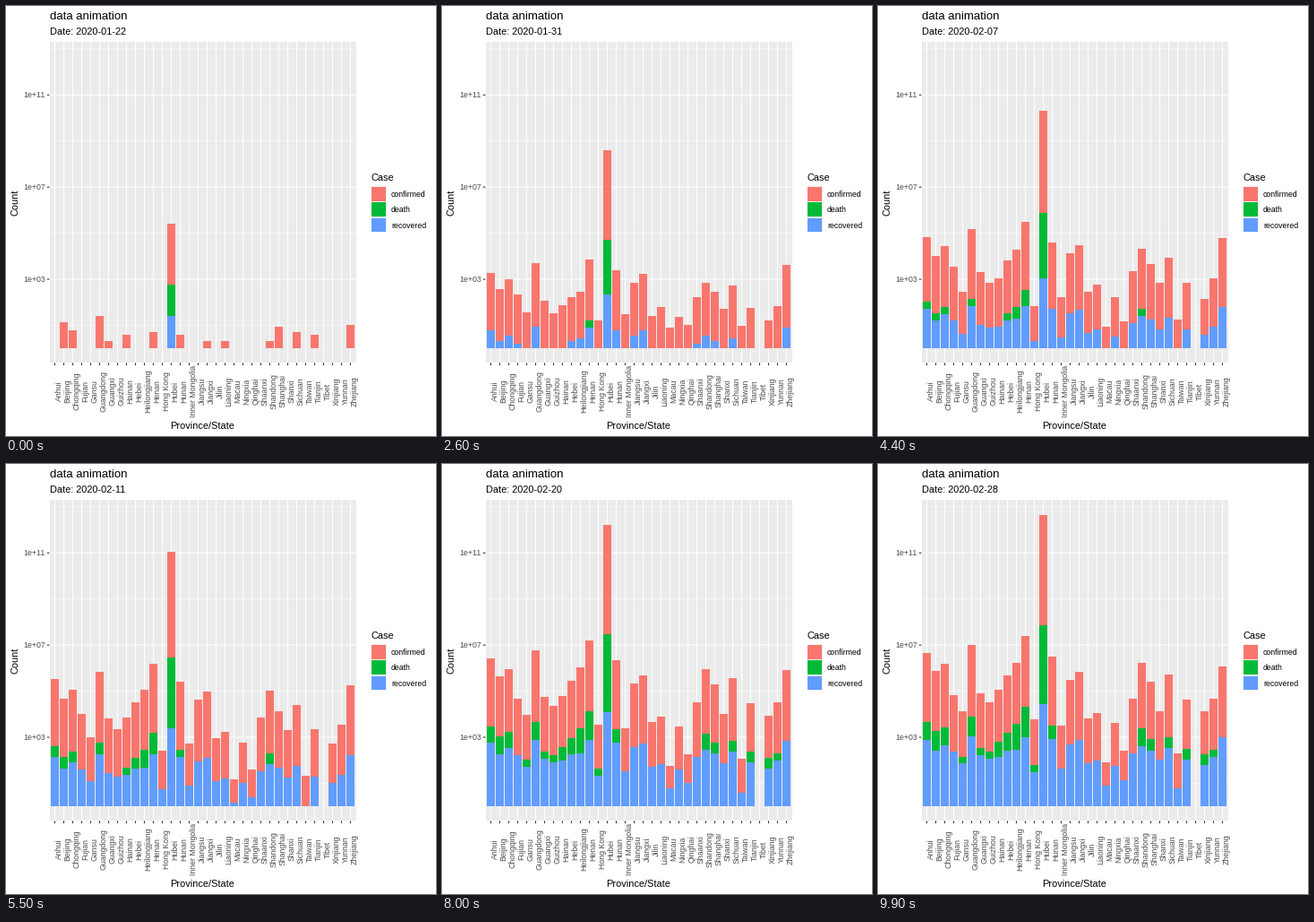
A matplotlib script that plays this animation: 480x480 px, repeating every 10000 ms.

```python
import matplotlib.pyplot as plt
import numpy as np
from matplotlib.animation import FuncAnimation
from matplotlib.collections import PolyCollection
from matplotlib.patches import Rectangle

SIZE, DPI = 480, 80
PT = 72 / DPI                      # points per pixel
FRAMES, LAST = 100, 37             # frames per loop, last day
LEFT, RIGHT, TOP, BOTTOM = 48.5, 390.5, 39.5, 398.4
X0, STEP, BAR = 54.5, 10, 9
BASE, DECADE = 382.2, 25.72
START = np.datetime64("2020-01-22")
CASES = (("confirmed", "#F8766D"), ("death", "#00BA38"), ("recovered", "#619CFF"))
DAYS = np.arange(LAST + 1)

names, logs = [], []


def log_count(x):
    """log10 of whole counts; NaN where there are none."""
    n = np.round(x)
    return np.where(n >= 1, np.log10(np.maximum(n, 1)), np.nan)


def spread(start, early, final, rate):
    """Fast rise to day 5, then Gompertz growth towards the final count."""
    s, e, f = np.log10([start, early, final])
    rise = s + (e - s) * np.minimum(DAYS / 5, 1) ** 0.75
    settle = f - (f - e) * np.exp(-rate * (DAYS - 5))
    return 10 ** np.where(DAYS < 5, rise, settle)


def approach(final, depth, bend, floor):
    """Reach the final count on the last day, `depth` decades lower on day 10."""
    gap = depth * ((LAST - DAYS) / (LAST - 10)) ** bend
    return np.maximum(final * 10 ** -gap, floor)


def add(name, early, final, start=1, deaths=0, cured=0.8, rate=0.16, bend=2):
    names.append(name)
    logs.append([
        log_count(spread(start, early, final, rate)),
        log_count(approach(deaths, 1.03, 2.2, 0.038 * start * (deaths > 0))),
        log_count(approach(cured * final, 2.05, bend, 0.057 * start)),
    ])


add("Anhui", 70, 990, deaths=6)
add("Beijing", 80, 410, start=14, deaths=7, cured=0.63)
add("Chongqing", 110, 576, start=6, deaths=6)
add("Fujian", 59, 296)
add("Gansu", 14, 91, deaths=2)
add("Guangdong", 151, 1349, start=26, deaths=7, rate=0.19)
add("Guangxi", 46, 252, start=2, deaths=2, cured=0.66)
add("Guizhou", 7, 146, deaths=2)
add("Hainan", 33, 168, start=4, deaths=5)
add("Hebei", 18, 318, deaths=6)
add("Heilongjiang", 21, 480, deaths=13, cured=0.6)
add("Henan", 128, 1272, start=5, deaths=20)
add("Hong Kong", 8, 150, deaths=2, cured=0.2, rate=0.06)
add("Hubei", 1423, 65914, start=444, deaths=2682, cured=0.4, rate=0.126, bend=1.4)
add("Hunan", 100, 1017, start=4, deaths=4, rate=0.19)
add("Inner Mongolia", 11, 75, cured=0.6)
add("Jiangsu", 47, 631)
add("Jiangxi", 72, 935, start=2)
add("Jilin", 6, 93)
add("Liaoning", 27, 121, start=2)
add("Macau", 6, 10)
add("Ningxia", 7, 72)
add("Qinghai", 6, 18)
add("Shaanxi", 35, 245)
add("Shandong", 75, 756, start=2, deaths=6, cured=0.53, rate=0.11)
add("Shanghai", 53, 337, start=9, deaths=3)
add("Shanxi", 13, 133, rate=0.19)
add("Sichuan", 69, 538, start=5, deaths=3, cured=0.62)
add("Taiwan", 5, 40, cured=0.15, rate=0.08)
add("Tianjin", 23, 136, start=4, deaths=3)
add("Tibet", 1, 1)
add("Xinjiang", 5, 76, deaths=3, rate=0.12)
add("Yunnan", 26, 174, deaths=2)
add("Zhejiang", 128, 1205, start=10, rate=0.22)

# Stack from the bottom: recovered, death, confirmed.
logs = np.array(logs)
present = ~np.isnan(logs)
heights = np.nan_to_num(logs)
tops = np.cumsum(heights[:, ::-1], axis=1)[:, ::-1]
bottoms = tops - heights

plt.rcParams["font.family"] = "Liberation Sans"
fig = plt.figure(figsize=(SIZE / DPI, SIZE / DPI), dpi=DPI, facecolor="white")
ax = fig.add_axes([0, 0, 1, 1])
ax.set(xlim=(0, SIZE), ylim=(SIZE, 0))
ax.axis("off")


def label(x, y, s, size, color="black", **kw):
    return ax.text(x, y, s, fontsize=size * PT, color=color, va="baseline",
                   rotation_mode="anchor", **kw)


def box(x, y, w, h, color):
    ax.add_patch(Rectangle((x, y), w, h, facecolor=color, linewidth=0))


def y_of(power):
    return BASE - DECADE * power


xs = X0 + STEP * np.arange(len(names))
grid = dict(colors="white", zorder=1.5, snap=False)
ticks = dict(colors="#333333", linewidths=1.07 * PT, zorder=3, snap=False)

box(LEFT, TOP, RIGHT - LEFT, BOTTOM - TOP, "#EBEBEB")
ax.hlines([y_of(p) for p in (1, 5, 9, 13)], LEFT, RIGHT,
          linewidths=0.53 * PT, **grid)
ax.hlines([y_of(p) for p in (3, 7, 11)], LEFT, RIGHT,
          linewidths=1.07 * PT, **grid)
ax.vlines(xs, TOP, BOTTOM, linewidths=1.07 * PT, **grid)

for p in (3, 7, 11):
    ax.hlines(y_of(p), LEFT - 2.75, LEFT, **ticks)
    label(44, y_of(p) + 3.2, f"1e+{p:02d}", 8.8, "#4D4D4D", ha="right")
ax.vlines(xs, BOTTOM, BOTTOM + 2.75, **ticks)
for x, name in zip(xs, names):
    label(x + 7, 430, name, 8.8, "#4D4D4D", ha="center", rotation=90)

label(49, 15, "data animation", 13.2)
date = label(49, 32, "", 11)
label(219.5, 472, "Province/State", 11, ha="center")
label(14, 219, "Count", 11, ha="center", rotation=90)

label(407, 195, "Case", 11)
bars = []
for k, (case, color) in enumerate(CASES):
    cy = 210 + 17.28 * k
    box(407.5, cy - 8.64, 17.28, 17.28, "#F2F2F2")
    box(408.2, cy - 7.93, 15.86, 15.86, color)
    label(430, cy + 3.2, case, 8.8)
    bars.append(ax.add_collection(
        PolyCollection([], facecolors=color, linewidths=0, snap=True, zorder=2),
        autolim=False))


def draw(i):
    t = i * LAST / (FRAMES - 1)
    day = int(t)
    nxt, f = min(day + 1, LAST), t - day
    hi = y_of(tops[:, :, day] * (1 - f) + tops[:, :, nxt] * f)
    lo = y_of(bottoms[:, :, day] * (1 - f) + bottoms[:, :, nxt] * f)
    for k, coll in enumerate(bars):
        coll.set_verts([
            [(x - BAR / 2, b), (x - BAR / 2, a), (x + BAR / 2, a), (x + BAR / 2, b)]
            for x, a, b, on in zip(xs, hi[:, k], lo[:, k], present[:, k, day]) if on])
    date.set_text(f"Date: {START + day}")
    return [*bars, date]


anim = FuncAnimation(fig, draw, frames=FRAMES, interval=100, repeat=True)
plt.show()
```
